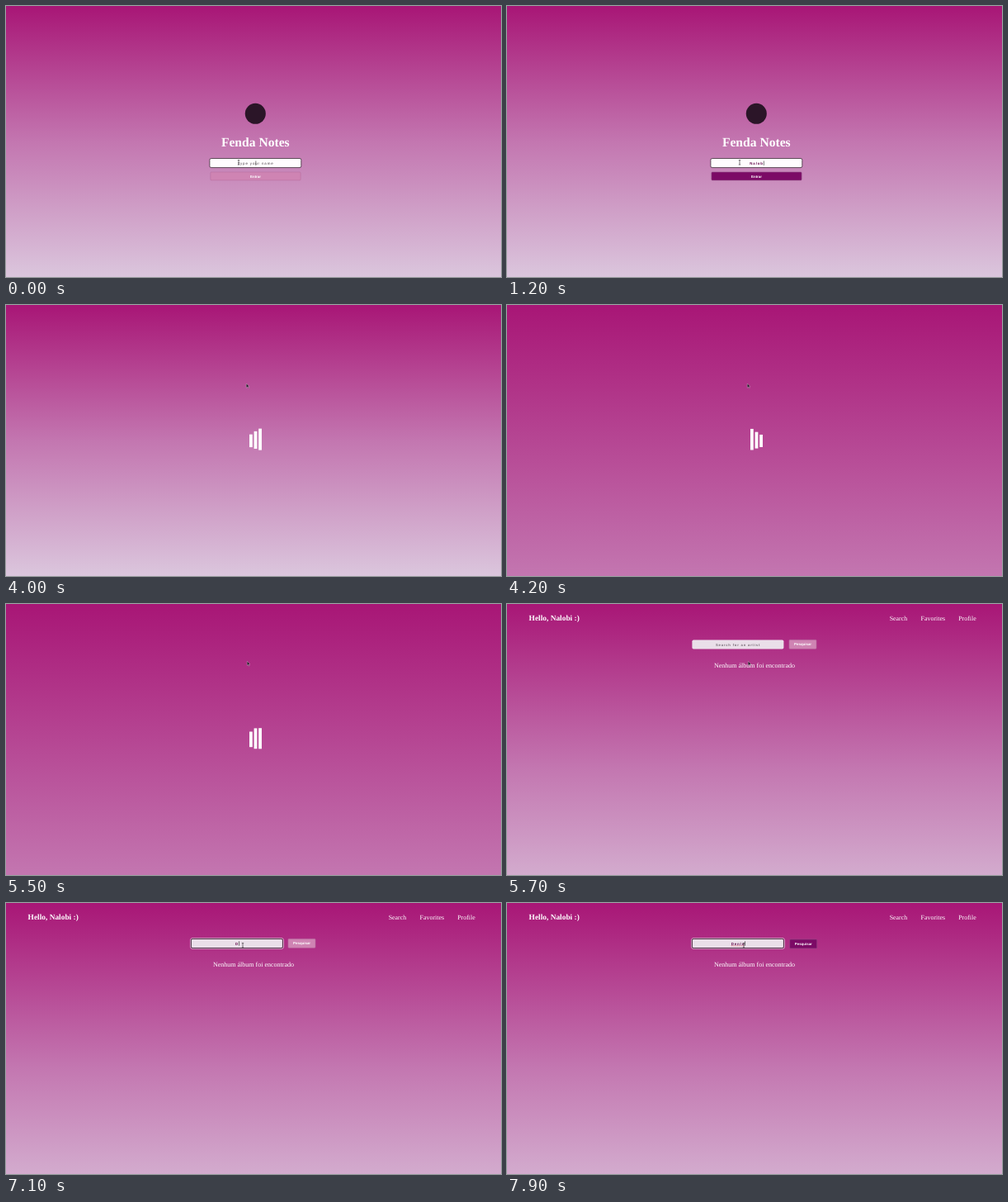
These frames come from a looping animation (600x328 px, 8000 ms). An HTML page:

```html
<!DOCTYPE html>
<html lang="en">
<head>
<meta charset="utf-8">
<title>Music search</title>
<style>
  html, body { margin: 0; width: 100%; height: 100%; overflow: hidden; background: #a81676; }
  svg { display: block; width: 600px; height: 328px; }
  text { text-rendering: geometricPrecision; fill: #fff; }
  .serif { font-family: "Liberation Serif", "Times New Roman", serif; font-size: 7.9px; }
  .sans { font-family: "Liberation Sans", Arial, sans-serif; font-size: 4.4px; }
  .bold { font-weight: 700; }
  .mid { text-anchor: middle; }
  .hint { letter-spacing: .88px; fill: #4c434b; }
  .value { letter-spacing: .88px; fill: #640a4c; font-weight: 700; }
</style>
</head>
<body>
<svg viewBox="0 0 600 328">
  <defs>
    <linearGradient id="sky" gradientUnits="userSpaceOnUse" x1="0" y1="0" x2="0" y2="328">
      <stop offset="0" stop-color="#a81676"/>
      <stop offset=".5" stop-color="#c376b0"/>
      <stop offset="1" stop-color="#dbc6dd"/>
    </linearGradient>
  </defs>
  <rect width="600" height="328" fill="url(#sky)"/>

  <g id="login">
    <circle cx="302.3" cy="130.3" r="12.5" fill="#2b1528"/>
    <text class="serif bold mid" x="302.3" y="170.3" style="font-size:15.6px">Fenda Notes</text>
    <rect x="246.9" y="184.5" width="110.9" height="11.1" rx="1.8" fill="#fffcfe" stroke="#33262f" stroke-width=".75"/>
    <text id="nameHint" class="sans hint mid" x="302.6" y="191.7">Type your name</text>
    <text id="nameValue" class="sans value mid" x="302.6" y="191.7"></text>
    <rect id="nameCaret" y="187.5" width=".6" height="5.4" fill="#222"/>
    <rect id="enter" x="247.9" y="201" width="109.2" height="9.9" rx="1" stroke-width=".6"/>
    <text class="sans bold mid" x="302.5" y="207.5">Entrar</text>
  </g>

  <g id="loader" fill="#fff">
    <rect x="295" width="3.75"/>
    <rect x="300.6" width="3.75"/>
    <rect x="306.2" width="3.75"/>
  </g>

  <g id="search">
    <text class="serif bold" x="26.6" y="20" style="font-size:9.4px">Hello, Nalobi :)</text>
    <text class="serif" x="463.7" y="19.6">Search</text>
    <text class="serif" x="501.6" y="19.6">Favorites</text>
    <text class="serif" x="547.2" y="19.6">Profile</text>
    <rect id="ring" x="223.6" y="42.6" width="112.8" height="12.8" rx="2.4" fill="none" stroke="#f1e4ee" stroke-width=".7"/>
    <rect id="field" x="224.4" y="43.4" width="111" height="11.2" rx="1.8" fill="#eadfe9"/>
    <text id="findHint" class="sans hint mid bold" x="280" y="50.6" style="font-size:4.2px;letter-spacing:.8px;fill:#776b76">Search for an artist</text>
    <text id="findValue" class="sans value mid" x="280" y="50.6"></text>
    <path id="spell" fill="none" stroke="#c3263c" stroke-width=".6" stroke-dasharray="1.2 .6"/>
    <rect id="findCaret" y="46.3" width=".6" height="5.4" fill="#222"/>
    <g id="find">
      <rect x="342" y="43.4" width="33" height="10.9" rx="1" stroke-width=".6"/>
      <text class="sans bold mid" x="358.6" y="50.4">Pesquisar</text>
    </g>
    <text class="serif mid" x="300" y="77.2" style="font-size:8px">Nenhum álbum foi encontrado</text>
  </g>

  <path id="arrow" d="M0 0V5.2L1.2 4.1L2 5.9L2.8 5.5L2 3.8H3.6Z" fill="#1d1420" stroke="#e8d5e4" stroke-width=".35"/>
  <path id="beam" d="M-1.2 -2.7H1.2M0 -2.7V2.7M-1.2 2.7H1.2" fill="none" stroke="#2a2229" stroke-width=".6"/>
</svg>
<script>
const LOOP = 8000, STEP = 100;
// Each request keeps its loader on screen for about 1.5 s
const LOGGING_IN = 2575, FETCHING = 4175, READY = 5675, FOCUS = 6600;
const NAME = { text: "Nalobi", keys: [400, 600, 800, 900, 1100, 1300], mid: 302.6 };
const ARTIST = { text: "Denlo", keys: [7000, 7200, 7400, 7600, 7800], mid: 280 };
const EM = 3.73, BAR_TOP = 157;
// time, x, y
const MOUSE = [
  [0, 282, 189.3], [1500, 282, 189.3], [2100, 294.5, 206], [2800, 294.5, 206],
  [3500, 291.3, 95], [4700, 291.3, 95], [5200, 292.3, 69.2], [5900, 292.3, 69.2],
  [6500, 287, 51.3], [LOOP, 287, 51.3]
];

const $ = id => document.getElementById(id);
const set = (el, attrs) => { for (const k in attrs) el.setAttribute(k, attrs[k]); };
const show = (el, on) => { el.style.display = on ? "" : "none"; };
const ease = p => p * p * (3 - 2 * p);
const bars = [...$("loader").children];

function mouseAt(t) {
  const i = MOUSE.findIndex(m => m[0] > t);
  const [t0, x0, y0] = MOUSE[i - 1], [t1, x1, y1] = MOUSE[i];
  const e = ease((t - t0) / (t1 - t0));
  return [x0 + (x1 - x0) * e, y0 + (y1 - y0) * e];
}

function typeInto(id, entry, t, focusAt) {
  const keys = entry.keys.filter(k => k <= t), count = keys.length;
  const value = $(id + "Value");
  value.textContent = entry.text.slice(0, count);
  const half = count ? value.getComputedTextLength() / 2 : 0;
  const last = count ? keys[count - 1] : focusAt;
  const caret = $(id + "Caret");
  set(caret, { x: entry.mid + half });
  show(caret, t >= focusAt && Math.floor((t - last) / 500) % 2 === 0);
  show($(id + "Hint"), !count);
  return { count, half };
}

function paintButton(el, on) {
  set(el, { fill: on ? "#7c0a66" : "#cf84b3", stroke: on ? "#8f4c84" : "#b86c9e" });
}

// Bars swell one after another, rising 2em and dropping 1em, then rest
function drawLoader(elapsed) {
  bars.forEach((bar, i) => {
    const p = (elapsed + (2 - i) * 160) / 1000 % 1;
    const swell = p < .8 ? ease(1 - Math.abs(p - .4) / .4) : 0;
    set(bar, { y: BAR_TOP - 2 * EM * swell, height: EM * (4 + 3 * swell) });
  });
}

function draw(t) {
  const login = t < LOGGING_IN, search = t >= READY;
  show($("login"), login);
  show($("loader"), !login && !search);
  show($("search"), search);
  set($("sky"), { y2: search ? 395 : t >= FETCHING ? 656 : 328 });

  if (login) {
    paintButton($("enter"), typeInto("name", NAME, t, 0).count >= 3);
  } else if (search) {
    const { count, half } = typeInto("find", ARTIST, t, FOCUS);
    const focused = t >= FOCUS, ready = count >= 2;
    show($("ring"), focused);
    set($("field"), { stroke: focused ? "#2a1726" : "none", "stroke-width": .8 });
    paintButton($("find").firstElementChild, ready);
    set($("find"), { transform: ready ? "translate(.7 .6)" : "" });
    show($("spell"), count === ARTIST.text.length);
    set($("spell"), { d: `M${280 - half} 51.8H${280 + half - .9}` });
  } else {
    drawLoader(t - (t < FETCHING ? LOGGING_IN : FETCHING));
  }

  const [x, y] = mouseAt(t);
  const typing = login && y < 196 || search && y < 55;
  show($("beam"), typing);
  show($("arrow"), !typing);
  set($(typing ? "beam" : "arrow"), { transform: `translate(${x} ${y})` });
}

const start = performance.now();
function frame() {
  const t = (performance.now() - start) % LOOP;
  draw(Math.floor(t / STEP) * STEP);
  requestAnimationFrame(frame);
}
frame();
</script>
</body>
</html>
```
